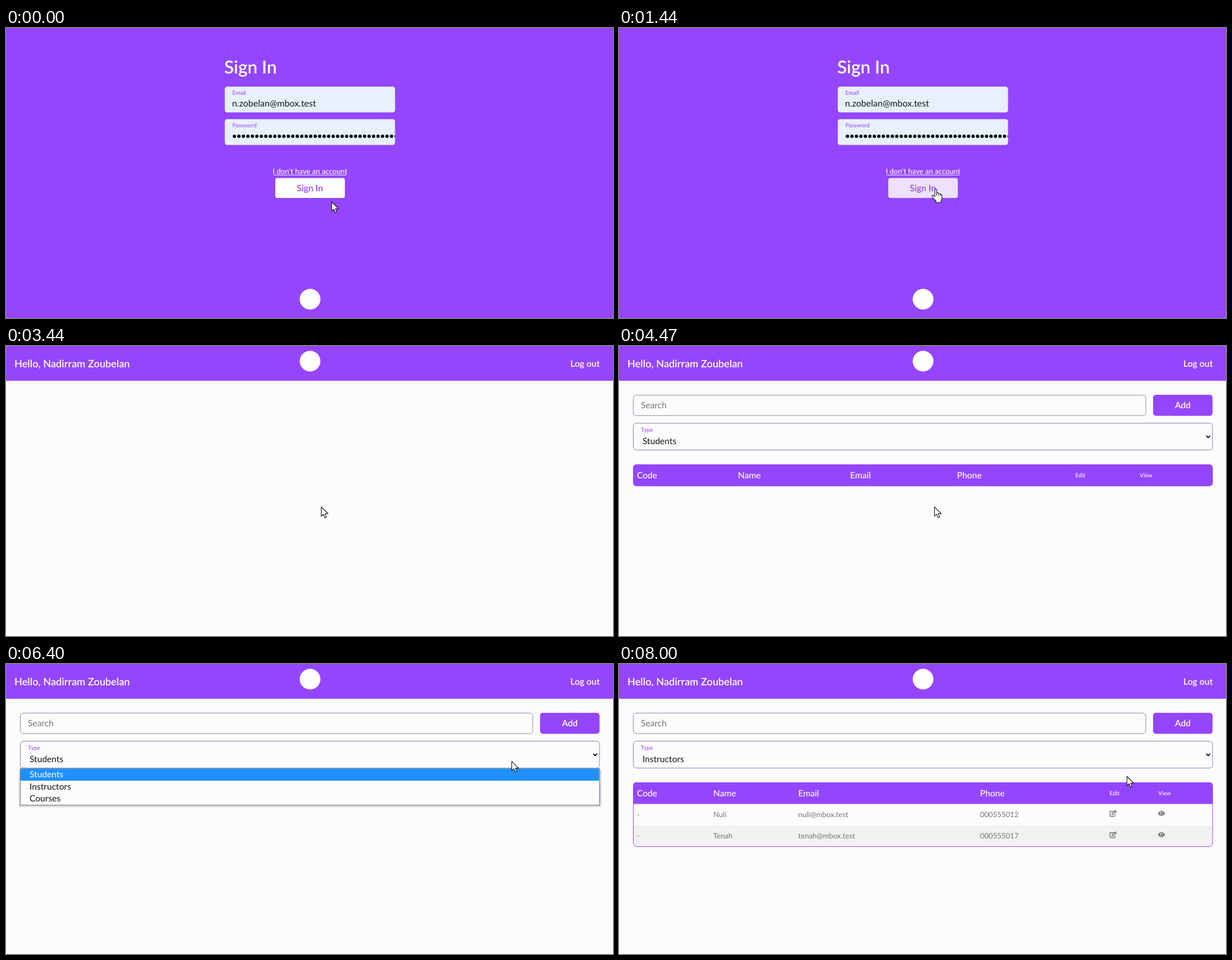
Write an HTML page that moves like this. It is 1082 px wide and 517 px high and loops after 8.16 s.

```html
<!DOCTYPE html>
<html lang="en">
<head>
<meta charset="utf-8">
<title>Sign in and browse</title>
<style>
  html, body { margin: 0; width: 100%; height: 100%; overflow: hidden; background: #fcfcfd; }
  svg { display: block; width: 100vw; height: 100vh; }
  text { font-family: Lato, "Open Sans", sans-serif; text-rendering: geometricPrecision; white-space: pre; }
</style>
</head>
<body>
<svg id="stage" viewBox="0 0 1082 517" preserveAspectRatio="none"></svg>
<script>
const NS = 'http://www.w3.org/2000/svg';
const LOOP = 8160;
const PURPLE = '#9446ff', INK = '#16161a', GREY = '#777779', PAGE = '#fcfcfd';
const stage = document.getElementById('stage');

function add(parent, tag, attrs = {}, content) {
  const el = document.createElementNS(NS, tag);
  for (const key in attrs) el.setAttribute(key, attrs[key]);
  if (content !== undefined) el.textContent = content;
  parent.appendChild(el);
  return el;
}
const group = parent => add(parent, 'g');
const box = (parent, x, y, width, height, rx, fill, more) =>
  add(parent, 'rect', { x, y, width, height, rx, fill, ...more });
const label = (parent, x, y, size, fill, content, weight = 400, more) =>
  add(parent, 'text', { x, y, 'font-size': size, 'font-weight': weight, fill, ...more }, content);
const show = (el, on) => el.setAttribute('visibility', on ? 'inherit' : 'hidden');
const logo = (parent, y) => add(parent, 'circle', { cx: 542, cy: y, r: 18.5, fill: '#fff' });

// Sign-in screen
const login = group(stage);
box(login, 0, 0, 1082, 517, 0, PURPLE);
label(login, 389, 81, 31.6, '#fff', 'Sign In', 600);
for (const y of [104.5, 162.5]) box(login, 390, y, 303.5, 46, 4.5, '#e8f0fb');
label(login, 403.5, 119, 10.3, PURPLE, 'Email');
label(login, 403, 140, 16, INK, 'n.zobelan@mbox.test');
label(login, 403.5, 177, 10.3, PURPLE, 'Password');
const clip = add(add(stage, 'defs'), 'clipPath', { id: 'field' });
box(clip, 390, 162.5, 303.5, 46, 4.5, '#000');
const dots = add(login, 'g', { 'clip-path': 'url(#field)' });
for (let i = 0; i < 37; i++) add(dots, 'circle', { cx: 407.2 + i * 8, cy: 193, r: 3, fill: '#000' });
label(login, 542, 260, 13.1, '#fff', "I don't have an account", 500, { 'text-anchor': 'middle' });
box(login, 477, 261.6, 130, 1, 0, '#fff');
const button = box(login, 480, 267.5, 124, 35.5, 4, '#fff');
label(login, 541.7, 291, 15.8, PURPLE, 'Sign In', 600, { 'text-anchor': 'middle' });
logo(login, 483.5);

// Dashboard
const home = group(stage);
box(home, 0, 0, 1082, 517, 0, PAGE);
box(home, 0, 0, 1082, 62, 0, PURPLE);
label(home, 15, 38, 18.2, '#fff', 'Hello, Nadirram Zoubelan', 600);
label(home, 1058.5, 37, 15.8, '#fff', 'Log out', 600, { 'text-anchor': 'end' });
logo(home, 27);

const content = group(home);
box(content, 25.5, 87.5, 913.5, 36.5, 5.5, PAGE, { stroke: '#8c86a0' });
label(content, 39, 111, 15.6, '#757578', 'Search');
box(content, 952, 87, 106, 37.5, 5, PURPLE);
label(content, 1005, 111.3, 15.6, '#fff', 'Add', 600, { 'text-anchor': 'middle' });
box(content, 25.5, 137.5, 1032.5, 48, 5.5, PAGE, { stroke: '#8b7fb4' });
label(content, 39, 153, 10.3, PURPLE, 'Type');
const choice = label(content, 42, 174.5, 15.6, INK, 'Students');
add(content, 'path', { d: 'M1046.8 160l3.4 3.4 3.4-3.4', fill: 'none', stroke: '#111', 'stroke-width': 1.9 });

const people = [
  ['-', 'Nuli', 'nuli@mbox.test', '000555012'],
  ['-', 'Tenah', 'tenah@mbox.test', '000555017']
];

function editIcon(parent, x, y) {
  const g = add(parent, 'g', { transform: `translate(${x} ${y})`, fill: 'none', stroke: '#66666a', 'stroke-width': 1.2 });
  add(g, 'path', { d: 'M7.5 2H1.6Q.6 2 .6 3V10Q.6 11 1.6 11H8.4Q9.4 11 9.4 10V7.5' });
  add(g, 'path', { d: 'M4 8l.5-2.4L10 .6 12 2.5 6.4 7.6Z M8.8 1.8l1.9 1.9' });
}

function eyeIcon(parent, x, y) {
  const g = add(parent, 'g', { transform: `translate(${x} ${y})` });
  add(g, 'path', { d: 'M0 4.5Q2.5 0 6.2 0T12.4 4.5Q10 9 6.2 9T0 4.5Z', fill: '#66666a' });
  add(g, 'circle', { cx: 6.2, cy: 4.5, r: 2.9, fill: '#66666a', stroke: PAGE, 'stroke-width': 1 });
  add(g, 'circle', { cx: 5.3, cy: 3.6, r: 0.9, fill: PAGE });
}

function table(columns, rows) {
  const g = group(content);
  const bottom = 250 + rows.length * 38;
  if (rows.length) {
    box(g, 25.5, 211.5, 1032.5, bottom - 212, 6, PAGE);
    add(g, 'path', { d: 'M26 288H1058V320Q1058 325.5 1052 325.5H32Q26 325.5 26 320Z', fill: '#f1f1f1' });
    box(g, 25.5, 211.5, 1032.5, bottom - 212, 6, 'none', { stroke: PURPLE });
    add(g, 'path', { d: 'M25 249.5V217Q25 211 31 211H1052Q1058.5 211 1058.5 217V249.5Z', fill: PURPLE });
  } else {
    box(g, 25, 211, 1033.5, 39, 6, PURPLE);
  }
  ['Code', 'Name', 'Email', 'Phone', 'Edit', 'View'].forEach((title, i) => {
    const small = i > 3;
    label(g, columns[i], small ? 233.7 : 235.5, small ? 10.2 : 15.6, '#fff', title, 500);
  });
  rows.forEach((row, r) => {
    const y = 272.5 + r * 38;
    row.forEach((cell, i) => label(g, columns[i], y, 13.2, GREY, cell));
    editIcon(g, columns[4], y - 11.8);
    eyeIcon(g, columns[5] - 0.2, y - 10.7);
  });
  return g;
}
const emptyTable = table([32, 212, 412, 602.5, 813.5, 928], []);
const fullTable = table([32, 168, 319.5, 643.5, 874.5, 961], people);

// Open list of the select
const menu = group(content);
for (let i = 4; i > 0; i--) {
  box(menu, 26 - i, 188, 1032 + 2 * i, 63.5 + i * 1.2, i, '#000', { opacity: 0.05 });
}
box(menu, 25.5, 186, 1032.5, 65.5, 0, PAGE, { stroke: '#78787c' });
const mark = box(menu, 26, 186.5, 1031.5, 21.5, 0, '#1e90ff');
const options = ['Students', 'Instructors', 'Courses'].map((name, i) =>
  label(menu, 42, 202.3 + i * 21.4, 15.6, INK, name));

// Pointers
const pointer = group(stage);
const outline = { fill: '#fff', stroke: '#111', 'stroke-width': 1.1, 'stroke-linejoin': 'round' };
const arrow = add(pointer, 'path', { ...outline, d: 'M0 0V16.6L3.8 13 6.5 19.2 9.2 18 6.6 12H12.2Z' });
const hand = group(pointer);
add(hand, 'path', { ...outline,
  d: 'M1 1.5Q1 0 2.7 0T4.3 1.5V7.5Q5 6.6 6.3 6.9T7.7 8.3Q9 7.6 10.3 8.6L10.9 9.6Q13.3 9 13.5 11.5V16Q13.5 19 11.8 21V24H3V21.5Q0 18.5-4 13.5-4.5 11.5-2.8 11.3-1.3 11.4 1 14Z' });
add(hand, 'path', { d: 'M4.3 7.5V12M7.7 8.3V12M10.9 9.6V12.5', fill: 'none', stroke: '#111' });

// time, x, y
const path = [
  [0, 580.5, 310], [170, 580.5, 310], [270, 580, 309.5], [570, 580, 309.5], [670, 579, 309],
  [840, 578, 308], [1100, 569, 297], [1380, 562, 287], [4470, 562, 287], [4600, 610, 268],
  [4770, 745, 220], [4940, 845, 190], [5100, 888, 178], [5340, 901.5, 173.5], [6400, 901.5, 173.5],
  [6540, 904, 196], [6700, 906, 214], [7040, 906, 214], [7600, 906, 204], [7840, 905.5, 200.5], [LOOP, 905.5, 200.5]
];

function place(t) {
  const i = Math.max(1, path.findIndex(p => p[0] > t));
  const [t0, x0, y0] = path[i - 1], [t1, x1, y1] = path[i];
  const k = (t - t0) / (t1 - t0);
  return [x0 + (x1 - x0) * k, y0 + (y1 - y0) * k];
}

function update(t) {
  const signedIn = t >= 3440;
  show(login, !signedIn);
  show(home, signedIn);

  const hover = Math.min(1, Math.max(0, (t - 950) / 250));
  button.setAttribute('fill', `rgb(${255 - 18 * hover},${255 - 30 * hover},${255 - 4 * hover})`);

  const loaded = t >= 7040;
  show(content, t >= 3840);
  show(emptyTable, !loaded);
  show(fullTable, loaded);
  choice.textContent = t >= 6840 ? 'Instructors' : 'Students';

  const picked = t >= 6700 ? 1 : 0;
  show(menu, t >= 5700 && t < 6840);
  mark.setAttribute('y', 186.5 + picked * 21.4);
  options.forEach((el, i) => el.setAttribute('fill', i === picked ? '#fff' : INK));

  const [x, y] = place(t);
  const pointing = t >= 950 && t < 1800;
  pointer.setAttribute('transform', `translate(${x.toFixed(2)} ${y.toFixed(2)})`);
  show(hand, pointing);
  show(arrow, !pointing);
}

const start = performance.now();
function frame() {
  update((performance.now() - start) % LOOP);
  requestAnimationFrame(frame);
}
update(0);
requestAnimationFrame(frame);
</script>
</body>
</html>
```
